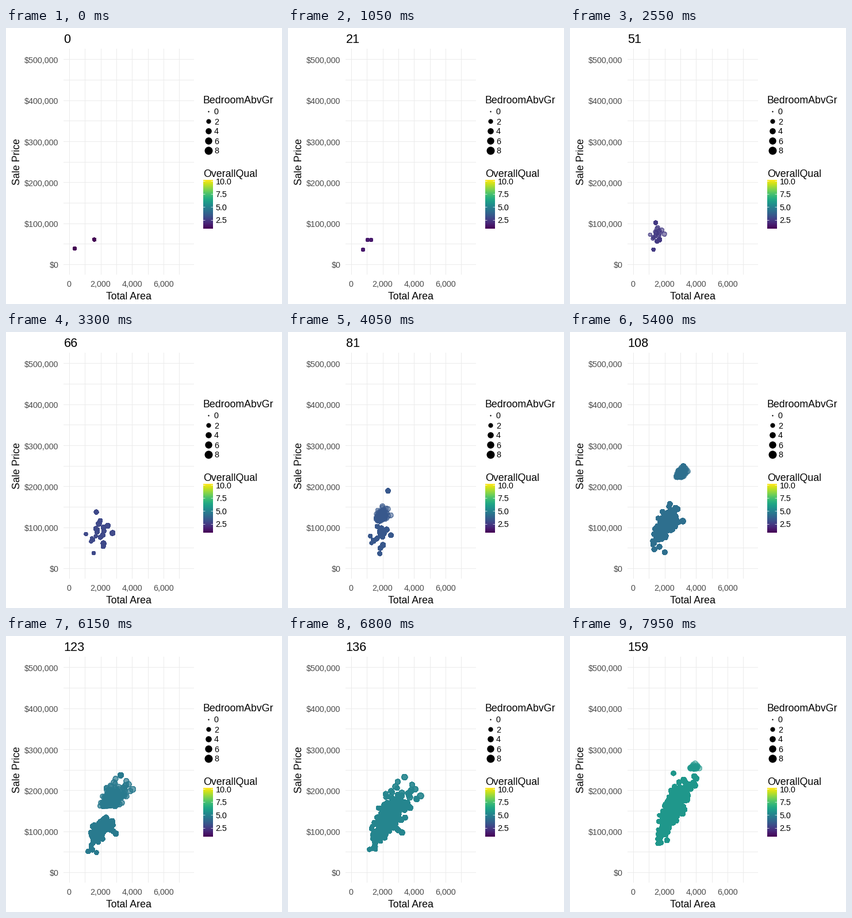
A matplotlib script that plays this animation: 480 px wide and 480 px high, repeating every 8000 ms.

```python
import numpy as np
import matplotlib.pyplot as plt
from matplotlib.animation import FuncAnimation

SIZE, DPI = 480, 96
PT = 72 / DPI                 # points per pixel
FRAMES, STEP_MS = 160, 50
SPAN = 300 / 9                # frames between two quality levels
INK, GREY, GRID = "black", "#4D4D4D", "#EBEBEB"
TITLE, HEAD, SMALL = 21.6, 17.7, 14.4

plt.rcParams["font.family"] = "Liberation Sans"
viridis = plt.get_cmap("viridis")
rng = np.random.default_rng(11)


def px_x(area):
    return 109.8 + 0.02738 * np.asarray(area)


def px_y(price):
    return 411 - 0.7132 * np.asarray(price)


def diameter(beds):
    return 2.4 + 11.6 * np.sqrt(np.asarray(beds) / 8)


def level(n, prices, areas, mid, sd, base, slope, skew):
    """Houses of one quality, sorted by price: area, price in thousands, bedrooms.

    prices and areas hold the values of the cheapest and the dearest house.
    """
    u = (np.arange(n) + 0.5) / n
    price = np.clip(mid + 0.6 * sd * np.log(u / (1 - u)), *prices)
    area = (base + slope * price) * np.exp(rng.normal(0, skew, n))
    area = np.clip(area, 850, 4500)
    price[[0, -1]], area[[0, -1]] = prices, areas
    beds = np.round(0.5 + area / 1100 + rng.normal(0, 0.5, n))
    return np.column_stack([area, price, np.clip(beds, 1, 6)])


levels = [
    np.array([[334, 39.3, 1], [1580, 61, 1]]),
    np.array([[970, 35.3, 1], [726, 60, 1], [1064, 60, 1]]),
    level(20, (38, 139.6), (1545, 1720), 86, 21, 1000, 9, 0.28),
    level(116, (35, 256), (2138, 3130), 107, 24, 850, 10.7, 0.2),
    level(397, (55, 229), (1530, 3317), 133, 25, 500, 13.5, 0.17),
    level(374, (76, 277), (1680, 4100), 160, 31, 750, 11, 0.12),
]

fig = plt.figure(figsize=(SIZE / DPI, SIZE / DPI), dpi=DPI, facecolor="white")
ax = fig.add_axes([0, 0, 1, 1])


def label(x, y, text, px, color=INK, ha="left", **kw):
    return ax.text(x, y, text, fontsize=px * PT, color=color, ha=ha,
                   va="baseline", **kw)


def line(xs, ys, color, width, z):
    ax.plot(xs, ys, color=color, lw=width * PT, zorder=z,
            solid_capstyle="butt", snap=False)


def draw_panel():
    for k in range(8):
        x = round(float(px_x(1000 * k)))
        line([x, x], [35.5, 428.5], GRID, 1, 1)
    for k in range(11):
        y = round(float(px_y(50 * k)))
        line([99.5, 326.5], [y, y], GRID, 1, 1)
    for area in range(0, 7000, 2000):
        label(px_x(area) - 0.5, 449, f"{area:,}", SMALL, GREY, "center")
    for price in range(0, 501, 100):
        label(91, px_y(price) + 6, f"${price * 1000:,}", SMALL, GREY, "right")
    label(213, 472, "Total Area", HEAD, ha="center")
    label(23, 232, "Sale Price", HEAD, ha="center", rotation=90,
          rotation_mode="anchor")


def draw_legends():
    label(342.5, 130.5, "BedroomAbvGr", HEAD)
    for k in range(5):
        y = 144 + 17 * k
        ax.scatter(351.5, y, s=(diameter(2 * k) * PT) ** 2, c=INK, lw=0,
                   antialiased=False)
        label(361.5, y + 6, str(2 * k), SMALL)
    label(342.5, 258.5, "OverallQual", HEAD)
    ramp = np.linspace(1, 0, 85)[:, None]
    ax.imshow(ramp, cmap=viridis, extent=(342.5, 359.5, 348.5, 263.5),
              aspect="auto", interpolation="bilinear", zorder=2)
    for q in (10, 7.5, 5, 2.5):
        y = 266 + 9.05 * (10 - q)
        for x in (342.5, 356.1):
            line([x, x + 3.4], [y, y], "white", 0.7, 3)
        label(364, y + 5, f"{q:.1f}", SMALL)


draw_panel()
draw_legends()
ax.axis("off")
ax.set_xlim(-0.5, SIZE - 0.5)
ax.set_ylim(SIZE - 0.5, -0.5)
title = label(100, 26, "0", TITLE)
dots = ax.scatter([], [], zorder=4, antialiased=False)


def update(frame):
    step, t = divmod(frame / SPAN, 1)
    a, b = levels[int(step)], levels[int(step) + 1]
    row = np.arange(max(len(a), len(b)))
    # Surplus rows leave from, or gather at, the last row of the shorter level.
    start = a[np.minimum(row, len(a) - 1)]
    end = b[np.minimum(row, len(b) - 1)]
    area, price, beds = (start + (end - start) * t).T

    growing = len(b) > len(a)
    colors = np.tile(viridis((step + t) / 9), (len(row), 1))
    near = t if growing else 1 - t
    colors[min(len(a), len(b)):, 3] = 0.4 + 0.6 * near ** 2
    if growing:
        colors[-1, 3] = 1

    dots.set_offsets(np.column_stack([px_x(area), px_y(price)]))
    dots.set_sizes(((diameter(beds) - 0.7) * PT) ** 2)
    dots.set_facecolor(colors)
    dots.set_edgecolor(colors)
    dots.set_linewidth(0.7 * PT)
    title.set_text(str(frame))
    return dots, title


anim = FuncAnimation(fig, update, frames=FRAMES, interval=STEP_MS,
                     repeat=True, repeat_delay=0)
plt.show()
```
